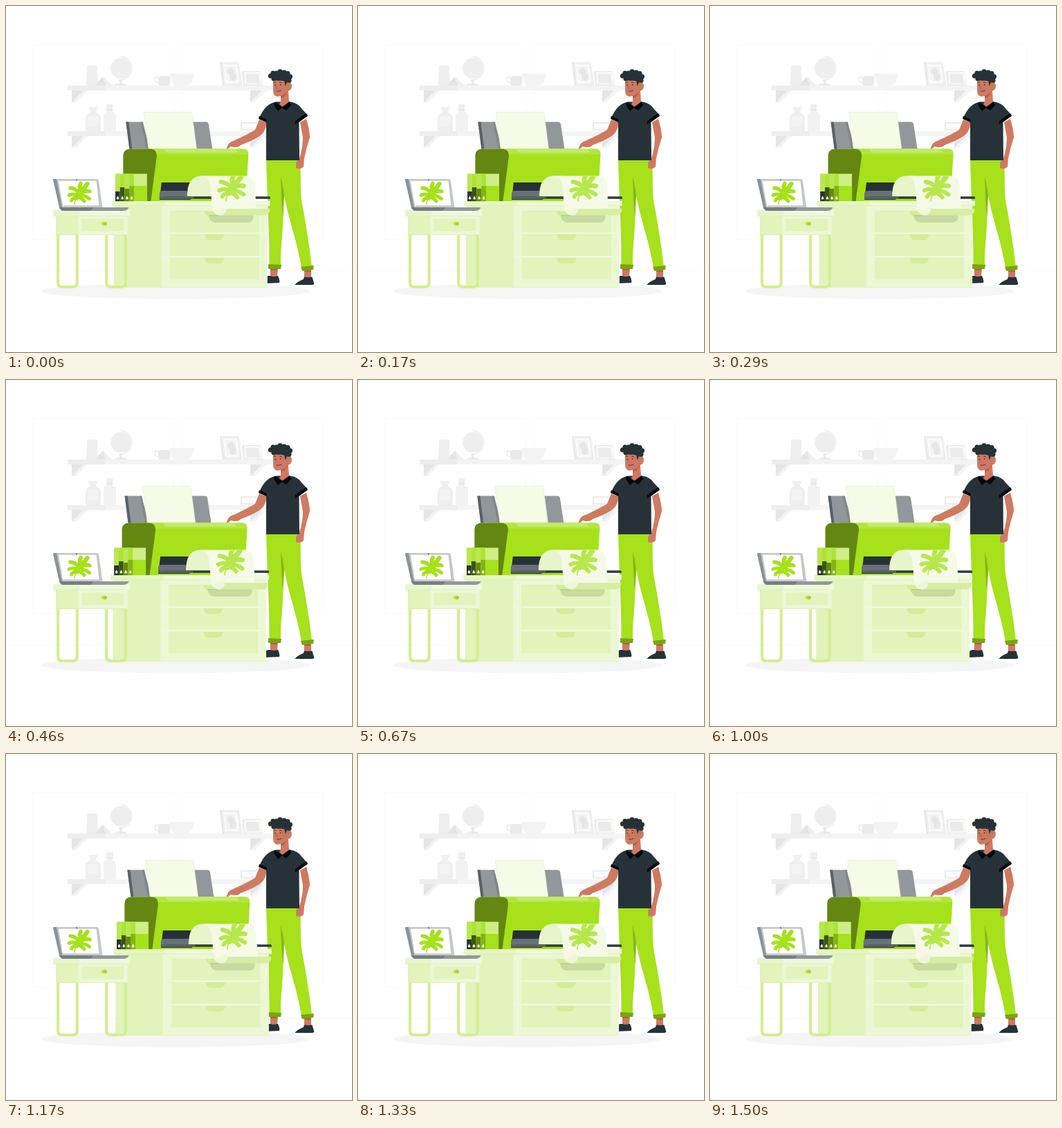
These frames come from a looping animation (500x500 px, 1.54 s). An HTML page with a canvas:

```html
<!DOCTYPE html>
<html lang="en">
<head>
<meta charset="utf-8">
<title>Shaking printer</title>
<style>
html, body { margin: 0; width: 100%; height: 100%; overflow: hidden; background: #fff; }
canvas { display: block; width: 100vw; height: 100vh; }
</style>
</head>
<body>
<canvas id="stage"></canvas>
<script>
const canvas = document.getElementById('stage');
const ctx = canvas.getContext('2d');
const ratio = window.devicePixelRatio || 1;
canvas.width = canvas.height = 500 * ratio;

const LIME = '#a6e11b', DARK = '#638711', INK = '#263238', SKIN = '#ce7a61';
const LOOP = 1540, SHAKE = 1500, START = 30, STEP = 1000 / 24;
const OFFSETS = [0, -1, 2, -4, 4, -4, 4, -4, 2, -1, 0];

const fill = (d, color) => { ctx.fillStyle = color; ctx.fill(new Path2D(d)); };
const rect = (x, y, w, h, color) => { ctx.fillStyle = color; ctx.fillRect(x, y, w, h); };
function line(d, color, width = 1) {
  ctx.strokeStyle = color;
  ctx.lineWidth = width;
  ctx.stroke(new Path2D(d));
}
function oval(x, y, rx, ry, color) {
  ctx.fillStyle = color;
  ctx.beginPath();
  ctx.ellipse(x, y, rx, ry, 0, 0, Math.PI * 2);
  ctx.fill();
}
function round(x, y, w, h, r, color) {
  ctx.fillStyle = color;
  ctx.beginPath();
  ctx.roundRect(x, y, w, h, r);
  ctx.fill();
}

// Lobes branch off a midrib that runs from the stem to the upper right tip.
function leaf(x, y, scale, color) {
  ctx.save();
  ctx.translate(x, y);
  ctx.scale(scale, scale);
  ctx.lineCap = ctx.lineJoin = 'round';
  line('M-3 6 Q2 0 5-5', color, 8);
  line('M4-4 Q9-8 12.500-13.500', color, 6.4);
  line('M3-3 Q0-8 3-14', color, 5.6);
  line('M4-1 Q10-4 16-2.500', color, 5.4);
  line('M1 0 Q-5-7 -12-7.500', color, 5.4);
  line('M2 3 Q9 3 15.500 8', color, 5.2);
  line('M-1 3 Q-8 0 -14 3', color, 5);
  line('M-2 6 Q-8 6 -10.500 10.500', color, 5);
  line('M0 6 Q5 7 8 11.500', color, 5);
  line('M-2 6 Q-6 10 -6 16', color, 1.4);
  ctx.restore();
}

function shelf(y) {
  rect(89, y, 296, 7, '#f4f4f4');
  rect(89, y, 55, 7, '#eeeeee');
  for (const x of [95, 353]) {
    fill(`M${x} ${y + 7}h23l-17 17h-6z`, '#f3f3f3');
    fill(`M${x} ${y + 7}h17l-17 17z`, '#e5e5e5');
  }
}

function room() {
  ctx.strokeStyle = '#f9f9f9';
  ctx.lineWidth = 1;
  for (const x of [39, 255]) {
    ctx.beginPath();
    ctx.roundRect(x, 55.5, 203.5, 282, 3);
    ctx.stroke();
  }
  line('M0 382.5H500', '#f7f7f7');
  oval(245, 412, 194, 11.5, '#f5f5f5');
  shelf(115);
  shelf(181);

  fill('M117 86h15v5q-1 3 0 7l1 17h-17l1-17q1-4 0-7z', '#efefef');
  fill('M128 115l12-13 12 13z', '#e5e5e5');
  fill('M140 102l4 13h9z', '#efefef');
  oval(166, 90, 14.8, 14.8, '#eeeeee');
  line('M166 73 A17 17 0 1 1 163 107', '#eeeeee', 1.8);
  fill('M164 106h4v6q6 0 7 3h-18q1-3 7-3z', '#eaeaea');
  line('M220 103 Q214 102 215 107 Q216 111 221 111', '#eeeeee', 2);
  fill('M236 98h36q-2 13-9 17h-19q-6-4-8-17z', '#f3f3f3');
  round(220, 101, 17, 14, 3, '#eaeaea');

  fill('M309 81h27l5 34h-28z', '#e5e5e5');
  fill('M311 81h26l4 34h-26z', '#efefef');
  fill('M314 84.500h20l3 27h-20z', '#fcfcfc');
  fill('M316 87h16l2.500 22h-16z', '#f3f3f3');
  oval(325, 95, 5, 5, '#e6e6e6');
  oval(328, 102, 5, 6, '#e6e6e6');
  fill('M341 94h27l3 21h-28z', '#ebebeb');
  fill('M344 95.500h24l2 18h-25z', '#fafafa');
  fill('M347 98h18l2 14h-19z', '#ececec');

  round(120, 146, 12, 4, 1, '#efefef');
  fill('M122 150h8v4q7 2 7 8v16q0 3-3 3h-16q-3 0-3-3v-16q0-6 7-8z', '#efefef');
  round(118, 159, 15, 15, 3, '#f4f4f4');
  round(145, 142, 10, 5, 1, '#efefef');
  fill('M146 147h8v6q5 1 5 6v19q0 3-3 3h-12q-3 0-3-3v-19q0-5 5-6z', '#f2f2f2');
  line('M145 150h10', '#e6e6e6', 2);
  rect(339, 168, 23, 12, '#ececec');
  rect(341, 170, 22, 8, '#fcfcfc');
}

function head() {
  fill('M386 105v17q0 8 6 9l5-1v8l-2 4 5 4 9-7-1-16q5-2 5-8-1-5-4-5l-2-7z', SKIN);
  fill('M397 130q7-2 9-7-1 8-9 10z', '#b0624c');
  fill('M383 101l6-5h17l6 5-1 8-5 1-2 6-2-8-14-1z', INK);
  const curls = [[382.5, 101], [386, 97], [391, 97], [396, 94.8], [402, 96], [407, 97.5], [410.5, 102], [409, 107.5], [387, 105], [394, 104.5], [401, 105]];
  for (const [x, y] of curls) oval(x, y, 3.6, 3.6, INK);
  oval(408.5, 115.5, 3.2, 4.2, SKIN);
  oval(389, 114.5, .8, 1.1, INK);
  oval(396.5, 114, .8, 1.1, INK);
  line('M387 111l3-1M395 110l4 1', INK, .8);
  line('M391.500 115l-1 4 2 .5', '#ad5944', .8);
  line('M391 123q4 1 7-1', INK, .8);
}

function person() {
  fill('M376 391l3-1h14q3 6 2 10l-22 1q0-5 3-10z', INK);
  fill('M417.500 403q2-4 12-8l2-4 11 .5 3 10.500-3 1z', INK);
  fill('M382 378h11l-1 12q-5 2-10 0z', SKIN);
  fill('M431 381h10v10q-5 2-10 0z', SKIN);
  rect(382, 380, 10, 2, '#b35d47');
  rect(431, 382, 10, 2, '#b35d47');
  fill('M376 222H425C427 248 424 268 429 292C434 318 439 350 442 377L427 378C421 340 407 306 401 268L400.500 305C399.500 338 397 345 397 374H380.500C381 335 378 290 376 222z', LIME);
  fill('M397 247q3 12 5 26l-1.500 32-2-22z', '#83b315');
  fill('M379 373l19 1-1 6h-18z', '#78a414');
  fill('M426 377l19-2-1 6-16 2z', '#78a414');

  fill('M366 164l10 4q1 11-8 19-12 8-29 14-4 4-10 3l-4-1-4 3q-3 1-2-1 2-7 7-9l8-3.500q15-7 26-13.500z', SKIN);
  fill('M425 168l9-5q5 17 5 27-5 15-8 30l-1 12q-4 5-11 2-1-10 5-14 5-15 5-30z', SKIN);
  fill('M390 138.500h21q11 2 16 9.500l9 10-12.500 10 .5 55h-48v-57l-10-4q5-12 11-17 5-5 13-6.500z', INK);
  fill('M366 159l11 5-1 4-11-5z', '#050708');
  fill('M418 166l16-11 2 4-18 12z', '#050708');
  head();
  fill('M389 139l-2 4 6 9 6-5 6 4 7-8-2-5-11 8z', '#050708');
}

function cabinet() {
  rect(156.2, 289, 70, 118, '#e2f4bc');
  rect(225, 289, 153, 118, '#ecf7d4');
  line('M156 406.600H378', '#dff1b8', .8);
  for (const y of [296, 330, 364]) {
    rect(237, y, 129, 31, '#e2f4bc');
    line(`M237 ${y + .3}h129`, '#d9eeaa', .6);
    fill(`M287 ${y}h28.500q-2 8-8 8h-13q-6 0-7.500-8z`, '#d3ed98');
  }
  line('M226 328.300H378M226 362.300H378', '#f3fae2', 1);
  rect(153.5, 281.5, 228.5, 7.5, '#eef8da');
  rect(153.5, 281.5, 76, 7.5, '#e5f5c4');
  line('M153.500 288.700H382', '#dbeeb0', .7);
}

function cartridges() {
  rect(158, 242.5, 46, 39.5, '#cdef86');
  rect(183, 260, 21, 22, LIME);
  const columns = [[158.2, 268, INK], [165, 262, '#3e540c'], [171.7, 264, DARK], [178.4, 260, '#83b315']];
  columns.forEach(([x, y, color], i) => {
    rect(x, 242.5, 6.7, 40, i % 2 ? '#aee335' : '#b8e74f');
    rect(x, y, 6.7, 282 - y, color);
    fill(`M${x + 3.4} 274.500q3.500 5 0 5-3.500 0 0-5z`, '#fff');
  });
}

function printer() {
  fill('M173.500 167.500h24l11 39h-30z', '#92979b');
  fill('M173.500 167.500h4l5 39h-4z', '#596167');
  fill('M195 167.500h3l9 39h-4z', '#81878b');
  fill('M270 167.500h19q3 0 4 3l5.500 36h-24z', '#92979b');
  fill('M199.200 153.500h69.500l7 53h-69.500z', '#f6fbe7');
  line('M199.200 153.500h69.500l7 53h-69.500z', '#e4efca', .6);

  fill('M190 206.500H343q8 0 7.500 8l-4 67.500H208z', LIME);
  fill('M205 206.500H343q7 0 7.500 8H218q-1-7-13-8z', '#b2e540');
  fill('M229 206.500H330q4 1 5 5.500H234q-3-1-5-5.500z', '#c2eb6b');
  fill('M169.500 282v-66q0-9 10-9.500h28q11 0 10.500 11l-8.500 64.500z', DARK);

  fill('M225 255h42v25h-45z', INK);
  fill('M222 270q1-3 5-3h34l4 3v9h-43z', '#687177');
  fill('M230 275.300h151q2 2 .5 3.500H222z', '#2f3a40');
  rect(222, 275.3, 50, 3.5, '#5b646a');
}

function sheet() {
  fill('M293 302h64.500q1 11-9 11h-46q-9-1-9.500-11z', 'rgba(80,100,35,.18)');
  fill('M308 293h73.500q0 9-8 9.500H307z', '#d7eda5');
  fill('M262 275q0-28 19-29.500h15l3 29.500z', '#e8f5cc');
  fill('M281 245.500h69q9 1 10 19l2 28.500h-44q0 9-9 9.500-10-1-11-11l-2-27q-2-19-15-19z', '#f5fae7');
  ctx.save();
  ctx.beginPath();
  ctx.rect(295, 246, 66, 47);
  ctx.clip();
  leaf(325, 263, 1.18, '#b8e74d');
  ctx.restore();
  fill('M300 294q9 2 13-4 5-1 5 3 0 9-9 9.500-6 0-9-8.500z', '#eff7da');
}

function desk() {
  ctx.lineCap = 'butt';
  for (const x of [73, 143]) {
    line(`M${x + 2.2} 330v70q0 6 6 6h15.500q6 0 6-6V330`, '#d3ee90', 4.2);
  }
  rect(72, 303, 32, 28, '#e2f3bc');
  rect(104, 303, 71.5, 28, '#ecf7d5');
  line('M72 330.600H175.500', '#d9eeaa', .8);
  rect(109.5, 307.5, 60.5, 17.5, '#e2f3bc');
  oval(142, 314.6, 4.2, 2.6, '#b4e04a');
  oval(143.5, 314.6, 2.3, 2.4, '#a1d12c');
  round(68, 295, 111, 8.5, 1, '#e7f5c9');
  rect(106, 295, 73, 8.5, '#eff8dc');
  line('M68 303.300H179', '#dbeeb0', .7);

  fill('M68 251q0-1 2-1h61q2 0 3 2l5.500 39H78z', '#c5c8ca');
  fill('M68 251q0-1 2-1h3l8 41h-4z', '#8c9296');
  fill('M76 252.800h54.500l4 35.500H82z', '#fff');
  oval(102, 251.3, .9, .8, INK);
  leaf(105, 270.5, 1, LIME);
  fill('M77 291h100.500q-2 5-8 5H83q-4 0-6-5z', '#92979b');
  fill('M77 291h49q-2 5-7 5H83q-4 0-6-5z', '#777e83');
}

function shakeAt(time) {
  const position = (time % SHAKE) / SHAKE * 10;
  const i = Math.floor(position);
  return OFFSETS[i] + (OFFSETS[i + 1] - OFFSETS[i]) * (position - i);
}

function draw(now) {
  const step = Math.floor((now % LOOP + 5) / STEP);
  ctx.setTransform(ratio, 0, 0, ratio, 0, 0);
  rect(0, 0, 500, 500, '#fff');
  room();
  person();
  ctx.save();
  ctx.translate(shakeAt(Math.min(step, 36) * STEP + START), 0);
  cabinet();
  printer();
  cartridges();
  sheet();
  ctx.restore();
  desk();
}

const began = performance.now();
function tick() {
  draw(performance.now() - began);
  requestAnimationFrame(tick);
}
tick();
</script>
</body>
</html>
```
